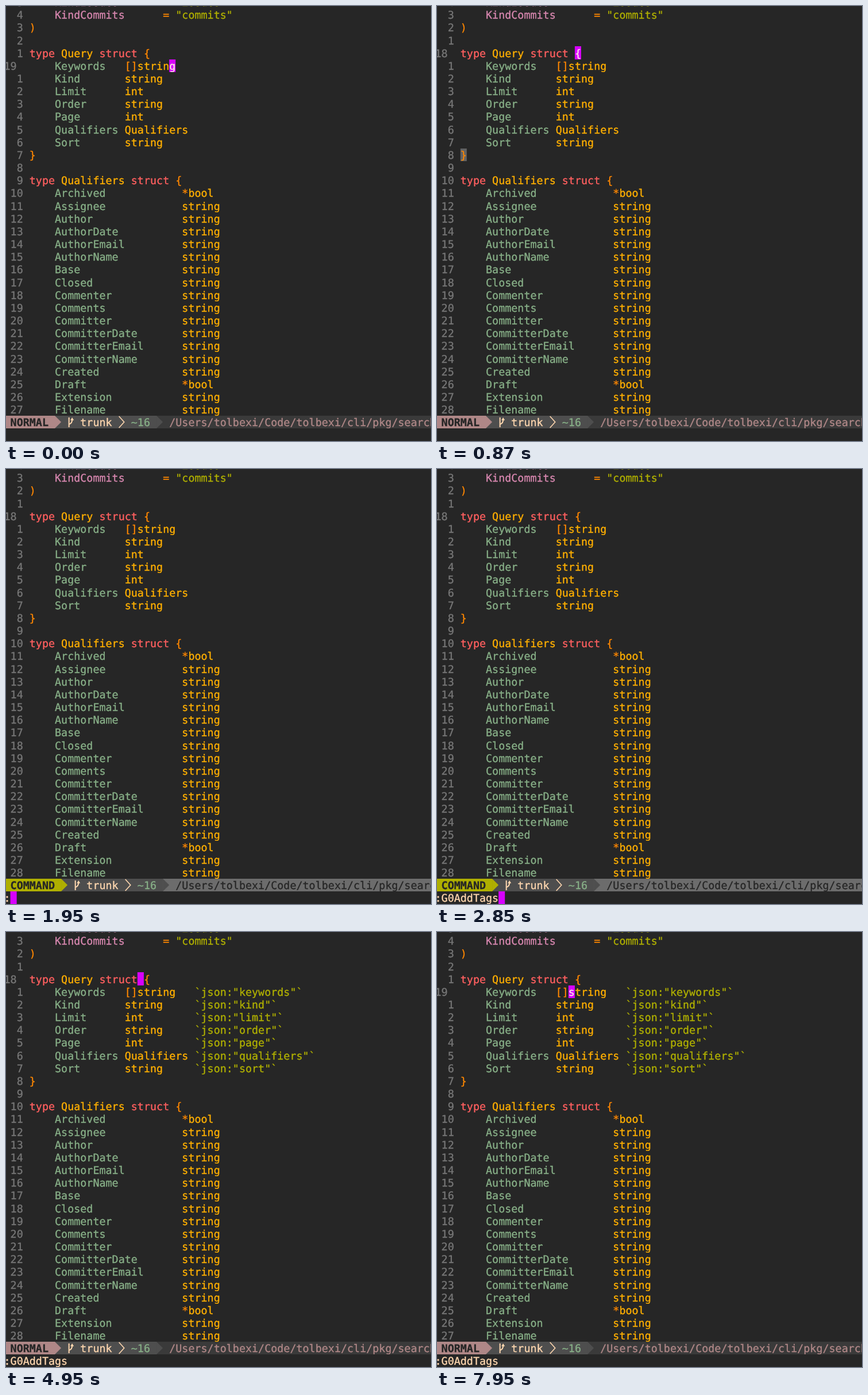
Write an HTML page with a canvas that moves like this. It is 740 by 757 pixels and loops after 8000 ms.

```html
<!DOCTYPE html>
<html lang="en">
<head>
<meta charset="utf-8">
<style>
  html, body { margin: 0; width: 100%; height: 100%; overflow: hidden; background: #262626; }
  canvas { display: block; }
</style>
</head>
<body>
<canvas id="screen" width="740" height="757"></canvas>
<script>
const ctx = document.getElementById('screen').getContext('2d');
const LOOP = 8000, CELL_W = 11.065, CELL_H = 22.16, LEFT = -3.5, TOP = 4, GUTTER = 4;
const STATUS_ROW = 32, COMMAND_ROW = 33, BASELINE = 18.2;
const FONT = '18.38px "DejaVu Sans Mono", monospace';
const C = {
  bg: '#262626', number: '#767676', red: '#ff5f5f', yellow: '#ffaf00', orange: '#ff8700',
  green: '#87af87', pink: '#d787af', olive: '#afaf00', cream: '#ffd7af', mauve: '#af8787',
  panel: '#4e4e4e', dim: '#3a3a3a', light: '#6c6c6c', match: '#626262',
  cursor: '#d700ff', onCursor: '#ffe4e4'
};

const queryFields = ['Keywords []string', 'Kind string', 'Limit int', 'Order string',
  'Page int', 'Qualifiers Qualifiers', 'Sort string'];
const qualifierFields = ('*Archived Assignee Author AuthorDate AuthorEmail AuthorName Base Closed ' +
  'Commenter Comments Committer CommitterDate CommitterEmail CommitterName Created *Draft ' +
  'Extension Filename').split(' ');

// Cursor columns count from the left screen edge, gutter included.
const steps = [
  { until: 150, line: 4, row: 4, col: 26 },
  { until: 1350, line: 3, row: 3, col: 22, match: true },
  { until: 1950, line: 3, row: 3, col: 21 },
  { until: 2850, line: 3, row: COMMAND_ROW, col: 1, typed: ':', command: true },
  { until: 4950, line: 3, row: COMMAND_ROW, col: 10, typed: ':G0AddTags', command: true },
  { until: 7950, line: 3, row: 3, col: 21, typed: ':G0AddTags', tags: true },
  { until: LOOP, line: 4, row: 4, col: 21, typed: ':G0AddTags', tags: true }
];
let step;

const colX = col => LEFT + col * CELL_W;
const rowY = row => TOP + row * CELL_H;

function fillCells(row, col, count, color) {
  const y = Math.round(rowY(row));
  ctx.fillStyle = color;
  ctx.fillRect(colX(col), y, count * CELL_W, Math.round(rowY(row + 1)) - y);
}

// A hairline stroke gives the slightly heavier weight of smoothed terminal text.
function put(row, col, text, color, bold) {
  ctx.font = (bold ? 'bold ' : '') + FONT;
  ctx.textRendering = 'geometricPrecision';
  ctx.lineWidth = 0.35;
  [...text].forEach((char, i) => {
    const underCursor = row === step.row && col + i === step.col;
    const x = colX(col + i), y = rowY(row) + BASELINE;
    ctx.fillStyle = ctx.strokeStyle = underCursor ? C.onCursor : color;
    ctx.fillText(char, x, y);
    ctx.strokeText(char, x, y);
  });
}

const code = (row, col, text, color) => put(row, col + GUTTER, text, color);

function drawStructHead(row, name) {
  code(row, 0, 'type', C.red);
  code(row, 5, name, C.yellow);
  code(row, 6 + name.length, 'struct', C.red);
  code(row, 13 + name.length, '{', C.orange);
}

function drawField(row, name, type, typeCol) {
  const prefix = type.match(/^(\[\]|\*)?/)[0];
  code(row, 4, name, C.green);
  code(row, typeCol, prefix, C.orange);
  code(row, typeCol + prefix.length, type.slice(prefix.length), C.yellow);
}

function drawCode() {
  ['Issues', 'Commits'].forEach((kind, i) => {
    code(i - 1, 4, 'Kind' + kind, C.pink);
    code(i - 1, 21, '=', C.orange);
    code(i - 1, 23, `"${kind.toLowerCase()}"`, C.olive);
  });
  code(1, 0, ')', C.orange);

  drawStructHead(3, 'Query');
  queryFields.forEach((field, i) => {
    const [name, type] = field.split(' ');
    drawField(4 + i, name, type, 15);
    if (step.tags) code(4 + i, 26, `\`json:"${name.toLowerCase()}"\``, C.olive);
  });
  code(11, 0, '}', C.orange);

  drawStructHead(13, 'Qualifiers');
  qualifierFields.forEach((name, i) => {
    drawField(14 + i, name.replace('*', ''), name[0] === '*' ? '*bool' : 'string', 24);
  });
}

function drawNumbers() {
  for (let row = -1; row < STATUS_ROW; row++) {
    const current = row === step.line;
    const label = current ? String(15 + row) : String(Math.abs(row - step.line)).padStart(3);
    put(row, 0, label, C.number);
  }
}

function arrow(col, color, outline) {
  const x = colX(col), y = Math.round(rowY(STATUS_ROW)), inset = outline ? 1 : 0;
  ctx.beginPath();
  ctx.moveTo(x + inset, y + inset);
  ctx.lineTo(x + CELL_W - inset, y + 11);
  ctx.lineTo(x + inset, y + 22 - inset);
  ctx.fillStyle = ctx.strokeStyle = color;
  ctx.lineWidth = 1.6;
  if (outline) ctx.stroke(); else ctx.fill();
}

function drawBranch(col) {
  const x = colX(col), y = rowY(STATUS_ROW);
  ctx.strokeStyle = ctx.fillStyle = C.cream;
  ctx.lineWidth = 2;
  ctx.beginPath();
  ctx.moveTo(x + 2.5, y + 3);
  ctx.lineTo(x + 2.5, y + 20);
  ctx.moveTo(x + 2.5, y + 15);
  ctx.quadraticCurveTo(x + 8, y + 13, x + 8, y + 7);
  ctx.stroke();
  ctx.beginPath();
  ctx.moveTo(x + 5, y + 8);
  ctx.lineTo(x + 8, y + 3);
  ctx.lineTo(x + 11, y + 8);
  ctx.fill();
}

function drawStatus() {
  const mode = step.command ? 'COMMAND' : 'NORMAL';
  const modeColor = step.command ? C.olive : C.mauve;
  const end = mode.length + 2;
  fillCells(STATUS_ROW, 0, 70, step.command ? C.light : C.dim);
  fillCells(STATUS_ROW, end, 16, C.panel);
  fillCells(STATUS_ROW, 0, end, modeColor);
  arrow(end, modeColor);
  arrow(end + 16, C.panel);
  put(STATUS_ROW, 1, mode, C.bg, true);
  drawBranch(end + 2);
  put(STATUS_ROW, end + 4, 'trunk', C.cream);
  arrow(end + 10, C.cream, true);
  put(STATUS_ROW, end + 12, '~16', C.green);
  put(STATUS_ROW, end + 18, '/Users/tolbexi/Code/tolbexi/cli/pkg/search', step.command ? C.bg : C.mauve);
}

function draw(now) {
  const time = now % LOOP;
  step = steps.find(s => time < s.until);
  ctx.fillStyle = C.bg;
  ctx.fillRect(0, 0, 740, 757);
  if (step.match) fillCells(11, GUTTER, 1, C.match);
  fillCells(step.row, step.col, 1, C.cursor);
  drawNumbers();
  drawCode();
  drawStatus();
  put(COMMAND_ROW, 0, step.typed || '', C.cream);
  requestAnimationFrame(draw);
}
draw(performance.now());
</script>
</body>
</html>
```
